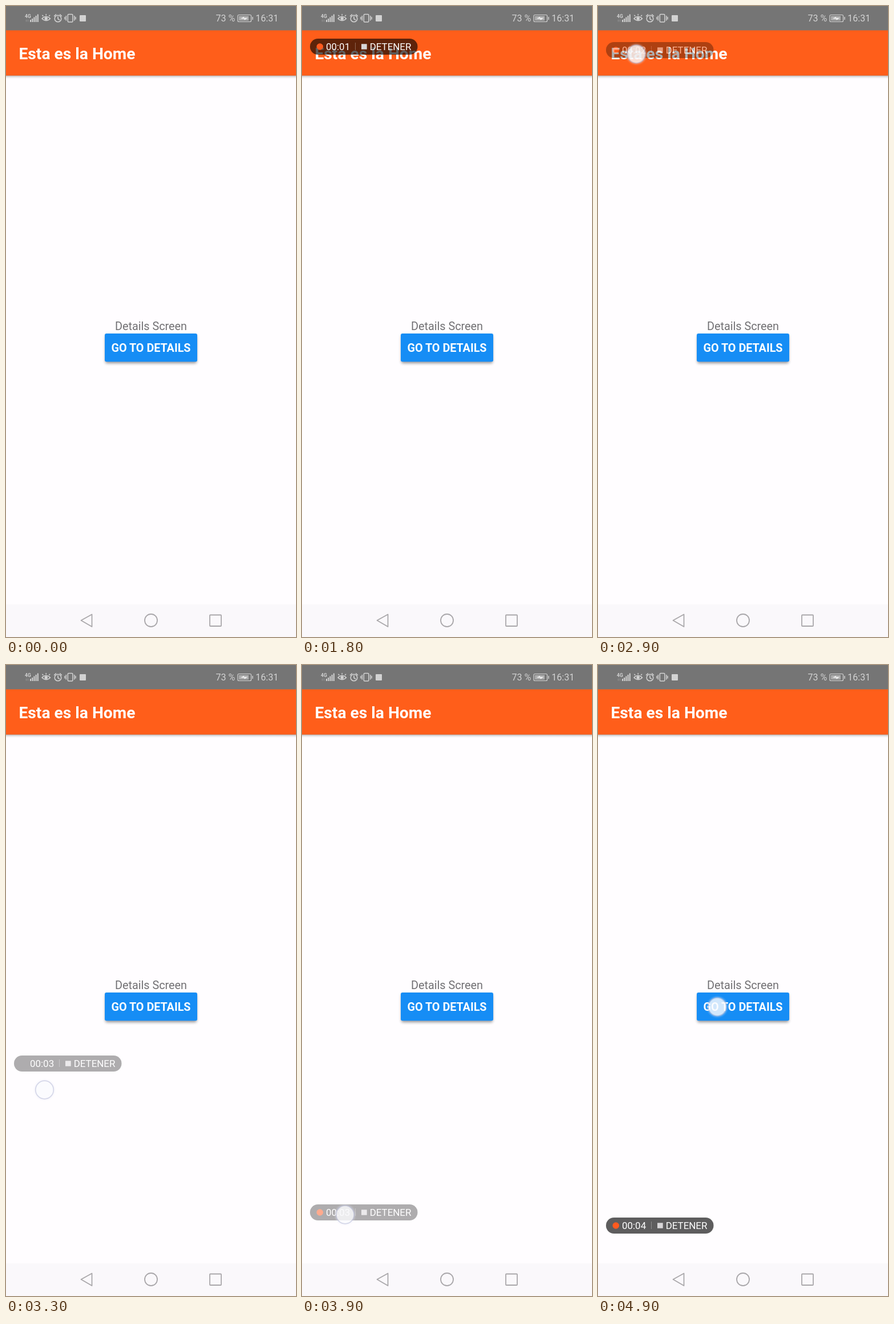
Animation of 508 by 1102 pixels, one loop 5 s. Source, as an HTML page:

```html
<!DOCTYPE html>
<html lang="es">
<head>
<meta charset="utf-8">
<title>Esta es la Home</title>
<style>
html, body { margin: 0; width: 100%; height: 100%; overflow: hidden; background: #fffdff; }
svg { display: block; width: 100%; height: 100%; }
text { font-family: Roboto, "Noto Sans", sans-serif; }
</style>
</head>
<body>
<svg viewBox="0 0 508 1102">
  <defs>
    <filter id="soft" x="-20%" y="-40%" width="140%" height="180%"><feGaussianBlur stdDeviation="2.4"/></filter>
    <linearGradient id="edge" x2="0" y2="1">
      <stop offset="0" stop-color="#000" stop-opacity=".36"/>
      <stop offset=".4" stop-color="#000" stop-opacity=".12"/>
      <stop offset="1" stop-color="#000" stop-opacity="0"/>
    </linearGradient>
    <radialGradient id="halo">
      <stop offset=".7" stop-color="#e4e6f4" stop-opacity=".45"/>
      <stop offset="1" stop-color="#e4e6f4" stop-opacity="0"/>
    </radialGradient>
  </defs>

  <rect width="508" height="1102" fill="#fffdff"/>

  <!-- header -->
  <rect y="121" width="508" height="6" fill="url(#edge)"/>
  <rect y="42" width="508" height="79.5" fill="#ff5e1a"/>
  <text x="22.5" y="93" font-size="28.2" font-weight="700" fill="#fff">Esta es la Home</text>

  <!-- status bar -->
  <rect width="508" height="42.5" fill="#757575"/>
  <g fill="#d2d2d2">
    <text x="33" y="20.5" font-size="8.5" font-weight="700">4G</text>
    <path d="M42 24h2v4h-2zM45.2 22h2v6h-2zM48.4 19.5h2v8.5h-2zM51.6 17h2v11h-2zM54.8 14.5h2v13.5h-2z"/>
    <path d="M35.5 23.5v4M38.5 23.5v4" stroke="#999" stroke-width="1"/>
    <rect x="129" y="16" width="11" height="11" rx="1"/>
    <text x="367.5" y="27.3" font-size="16">73 %</text>
    <text x="437.3" y="27.3" font-size="16">16:31</text>
  </g>
  <g fill="none" stroke="#d2d2d2" stroke-width="1.5" stroke-linecap="round">
    <path d="M63 22q7-7 14.500 0q-7 7-14.500 0zM70.200 16v-1.500M65 17.500l-1.200-1.300M75.500 17.500l1.200-1.300"/>
    <circle cx="70.200" cy="22" r="2" fill="#d2d2d2"/>
    <circle cx="91" cy="22" r="5.800"/>
    <path d="M91 18.500v4l2.500 1.500M84.500 17.500l3-2.700M97.500 17.500l-3-2.700"/>
    <rect x="108.300" y="14.500" width="8.600" height="13.500" rx="1.500"/>
    <path d="M105.300 17.500v7.500M103 19.500v3.500M119.800 17.500v7.500M122 19.500v3.500"/>
    <rect x="406" y="15.500" width="23.500" height="12" rx="2" stroke-width="1.200"/>
    <path d="M432 19.500v4"/>
  </g>
  <rect x="408" y="17.500" width="17" height="8" fill="#adadad"/>
  <path d="M411 22l6-3.300v2h6.500l-6 4v-2.200z" fill="#f0f0f0"/>

  <!-- body -->
  <text x="254" y="566.300" font-size="19.750" text-anchor="middle" fill="#717073">Details Screen</text>
  <rect x="174" y="575" width="160" height="49" rx="3" fill="#000" opacity=".4" filter="url(#soft)"/>
  <rect x="173" y="572" width="162" height="49.300" rx="3" fill="#168df5"/>
  <text x="254" y="604.300" font-size="19.750" font-weight="700" text-anchor="middle" fill="#fff">GO TO DETAILS</text>

  <!-- navigation bar -->
  <rect y="1045" width="508" height="57" fill="#faf8fb"/>
  <g fill="none" stroke="#a9a7aa" stroke-width="1.800" stroke-linejoin="round">
    <path d="M131.500 1073L150.500 1062.500V1084z"/>
    <circle cx="254" cy="1073" r="11"/>
    <rect x="357" y="1063.500" width="20" height="19.500" rx="1"/>
  </g>

  <!-- recorder pill, centred on y = 0 -->
  <g id="pill">
    <rect x="14" y="-14" width="188.500" height="28" rx="14" fill="#000" fill-opacity=".63"/>
    <circle id="dot" cx="31.300" cy="0" r="5.800" fill="#ff5a1f"/>
    <text id="clock" x="42" y="6.200" font-size="16.930" fill="#fff">00:00</text>
    <path d="M93.500-7V6" stroke="#fff" stroke-opacity=".3"/>
    <rect x="104" y="-4.700" width="9.700" height="9.400" fill="#d8d6d8"/>
    <text x="118.700" y="6.200" font-size="16.930" fill="#fff">DETENER</text>
  </g>

  <g id="touch">
    <circle r="20" fill="url(#halo)"/>
    <circle r="15.200" fill="#fff" fill-opacity=".68"/>
    <circle r="15.800" fill="none" stroke="#bfc2dc" stroke-opacity=".6" stroke-width="1.700"/>
  </g>
</svg>
<script>
const LOOP = 5000, STEP = 100;
const $ = id => document.getElementById(id);
const pill = $("pill"), dot = $("dot"), clock = $("clock"), touch = $("touch");

// [time, value] keys
const pillY = [[2700, 71], [2900, 77], [3100, 86], [3200, 330], [3300, 696], [3400, 815],
               [3500, 862], [3700, 920], [3900, 956], [4100, 972], [4200, 979]];
const pillAlpha = [[0, 0], [200, 1], [2600, 1], [2800, .5], [4100, .5], [4300, 1]];
const dragX = [[2700, 67], [3300, 67.500], [3900, 75.500]];
const dragY = [[2600, 70], [2900, 84], [3100, 98], [3200, 400], [3300, 742], [3400, 840],
               [3500, 875], [3700, 927], [3900, 960], [4100, 974]];

function at(keys, t) {
  if (t <= keys[0][0]) return keys[0][1];
  for (let i = 1; i < keys.length; i++) {
    const [t0, a] = keys[i - 1], [t1, b] = keys[i];
    if (t <= t1) return a + (b - a) * (t - t0) / (t1 - t0);
  }
  return keys[keys.length - 1][1];
}

function finger(t) {
  if (t >= 2100 && t < 2500) return [30, 327];
  if (t >= 2700 && t < 4200) return [at(dragX, t), at(dragY, t)];
  if (t >= 4800) return [209, 597];
  return null;
}

function draw(time) {
  const t = Math.floor(time % LOOP / STEP) * STEP;
  const seconds = Math.max(0, Math.floor((t - 155) / 1045));
  pill.setAttribute("transform", `translate(0 ${at(pillY, t)})`);
  pill.setAttribute("opacity", at(pillAlpha, t));
  clock.textContent = "00:0" + seconds;
  dot.setAttribute("opacity", (t + 940) % 1040 < 460 ? 0 : 1);

  const spot = finger(t);
  touch.setAttribute("visibility", spot ? "visible" : "hidden");
  if (spot) touch.setAttribute("transform", `translate(${spot})`);
}

const start = performance.now();
function tick() {
  draw(performance.now() - start);
  requestAnimationFrame(tick);
}
tick();
</script>
</body>
</html>
```
